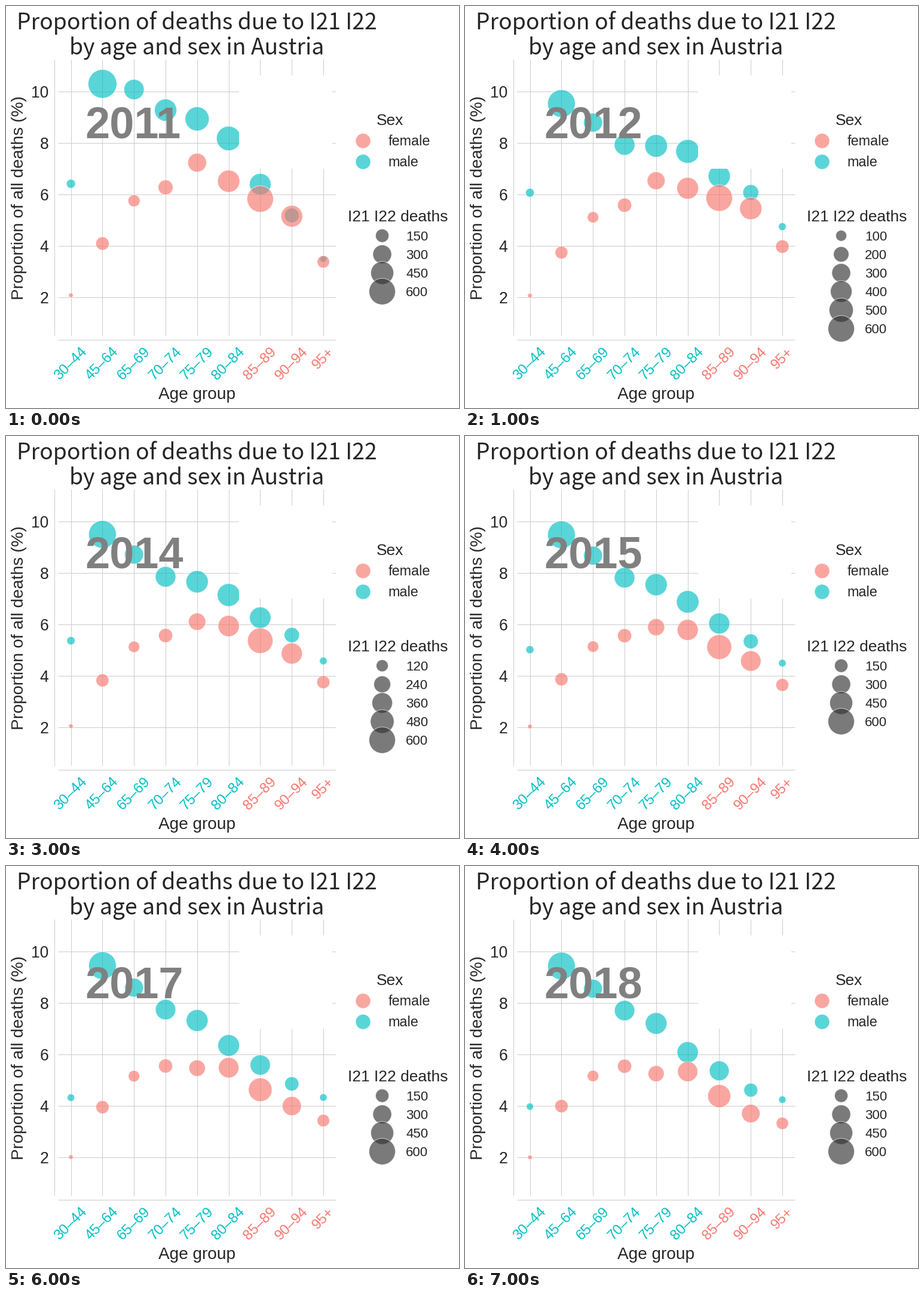
Write a matplotlib script that moves like this. It is 758 by 672 pixels and loops after 8000 ms.

```python
import matplotlib.pyplot as plt
import numpy as np
from matplotlib.animation import FuncAnimation
from matplotlib.patches import Rectangle

W, H, DPI = 758, 672, 64
PT = 72 / DPI  # points per pixel

INK, GRID = "#262626", "#cccccc"
FEMALE, MALE, GREY = "#F8766D", "#00BFC4", "#333333"
ALPHA = 0.65

FIRST_YEAR, YEARS = 2011, 8
AGES = ["30–44", "45–64", "65–69", "70–74", "75–79",
        "80–84", "85–89", "90–94", "95+"]
AGE_INDEX = np.arange(len(AGES))
AGE_X = 108.6 + 52.8 * AGE_INDEX


class Group:
    """One sex: age profile in the first and last year, and bubble sizes."""

    def __init__(self, first, last, radius, swing):
        self.first, self.last = np.array(first), np.array(last)
        self.radius, self.swing = np.array(radius), swing

    def share(self, i):
        # Linear trend plus a shift from middle to old age that jumps in
        # after the first year and then fades out.
        t = i / (YEARS - 1)
        shift = self.swing * min(i, (YEARS - 1 - i) / (YEARS - 2))
        wave = -np.sin(np.pi * AGE_INDEX / 5.3)
        return self.first + (self.last - self.first) * t + shift * wave

    def size(self, i):
        # Bubble area grows with the share.
        typical = (self.first + self.last) / 2
        return self.radius * np.sqrt(self.share(i) / typical)


men = Group(first=[6.42, 10.3, 10.08, 9.28, 8.94, 8.18, 6.4, 5.19, 3.5],
            last=[3.98, 9.44, 8.56, 7.71, 7.21, 6.09, 5.37, 4.62, 4.25],
            radius=[6.5, 23.2, 16, 17.5, 18.8, 18.8, 17, 11.6, 5.6],
            swing=1.15)
women = Group(first=[2.09, 4.1, 5.76, 6.28, 7.24, 6.52, 5.83, 5.16, 3.39],
              last=[2.01, 4.0, 5.17, 5.55, 5.26, 5.34, 4.39, 3.71, 3.33],
              radius=[3.5, 10.8, 9.5, 11.8, 14.3, 17.4, 20.4, 16.5, 10],
              swing=0.6)


def share_y(share):
    return 143.05 + (10 - share) * 43.05


def area(radius):
    return ((2 * np.asarray(radius) + 0.5) * PT) ** 2


def line(x0, y0, x1, y1):
    ax.plot([x0, x1], [y0, y1], color=GRID, lw=PT, zorder=1,
            solid_capstyle="butt")


def text(x, y, s, px, font="Liberation Sans", color=INK, **kw):
    kw.setdefault("va", "baseline")
    return ax.text(x, y, s, fontsize=px * PT, family=font, color=color,
                   zorder=6, **kw)


def bubbles(color, zorder, x=(), y=(), radius=()):
    return ax.scatter(x, y, s=area(radius), c=color, alpha=ALPHA,
                      edgecolors="white", linewidths=PT, zorder=zorder)


def legend_counts(year):
    step = {2012: 100, 2014: 120}.get(year, 150)
    return np.arange(step, 601, step)


fig = plt.figure(figsize=(W / DPI, H / DPI), dpi=DPI, facecolor="white")
ax = fig.add_axes([0, 0, 1, 1])
ax.set_xlim(0, W)
ax.set_ylim(H, 0)
ax.axis("off")

# Grid and detached axis lines
for x in AGE_X:
    line(x, 89, x, 551)
for v in range(2, 11, 2):
    y = share_y(v)
    line(87, y, 552, y)
    text(71.5, y + 9.5, str(v), 26.5, ha="right")
line(81.2, 89, 81.2, 551)
line(87, 558.2, 552, 558.2)

# Blank card in the upper right of the plot
ax.add_patch(Rectangle((390, 116), 156, 156, color="white", lw=0, zorder=5))

# Titles and axis labels
for y, s in ((39, "Proportion of deaths due to I21 I22"),
             (81.5, "by age and sex in Austria")):
    text(319.5, y, s, 37.3, font="Noto Sans CJK JP", ha="center")
text(319.5, 657, "Age group", 28, ha="center")
text(29.5, 320.5, "Proportion of all deaths (%)", 28.1, ha="center",
     rotation=90, rotation_mode="anchor")
for i, (x, age) in enumerate(zip(AGE_X, AGES)):
    text(x, 567, age, 24, color=MALE if i < 6 else FEMALE,
         ha="center", va="top", rotation=45)

# Sex legend
text(619.5, 199, "Sex", 26.4)
for y, s, color in ((224.8, "female", FEMALE), (259.8, "male", MALE)):
    bubbles(color, 3, [597.3], [y], [12.3])
    text(639.5, y + 8.2, s, 23.4)

# Parts that change every year
text(572, 360.5, "I21 I22 deaths", 26.4)
size_dots = bubbles(GREY, 3)
size_labels = [text(669, 392 + 31 * i, "", 22.2) for i in range(6)]
male_dots = bubbles(MALE, 3)
female_dots = bubbles(FEMALE, 4)
year_label = text(132, 220.4, "", 74, color="#808080", weight="bold")


def place(dots, x, y, radius):
    dots.set_offsets(np.column_stack([x, y]))
    dots.set_sizes(area(radius))


def draw(i):
    year = FIRST_YEAR + i
    for dots, group in ((male_dots, men), (female_dots, women)):
        place(dots, AGE_X, share_y(group.share(i)), group.size(i))

    counts = legend_counts(year)
    rows = 384 + 31.1 * np.arange(len(counts))
    place(size_dots, np.full(len(counts), 629.5), rows, np.sqrt(0.79 * counts))
    for k, label in enumerate(size_labels):
        label.set_text(str(counts[k]) if k < len(counts) else "")
    year_label.set_text(str(year))
    return male_dots, female_dots, size_dots, year_label, *size_labels


anim = FuncAnimation(fig, draw, frames=YEARS, interval=1000,
                     init_func=lambda: draw(0), repeat=True, repeat_delay=0)
plt.show()
```
